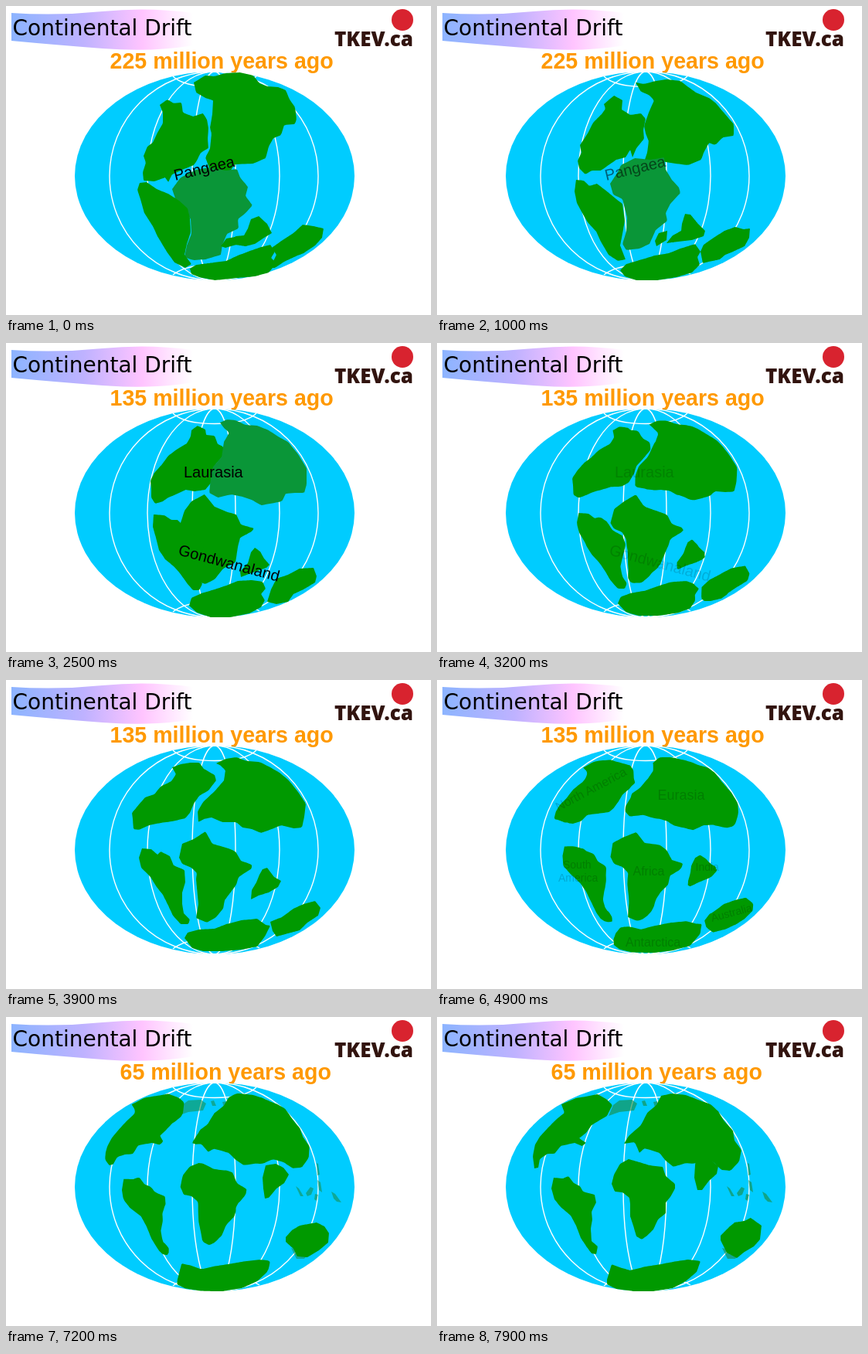
An HTML page for the animation above (8000 ms loop, 550 by 400 pixels).

```html
<!DOCTYPE html>
<html lang="en">
<head>
<meta charset="utf-8">
<title>Continental Drift</title>
<style>
html, body { margin: 0; width: 550px; height: 400px; overflow: hidden; background: #fff; }
svg { display: block; }
text { font-family: "Liberation Sans", Arial, sans-serif; }
#heading { font: 28px "DejaVu Sans", Verdana, sans-serif; }
#brand { font: 800 26px "Open Sans", sans-serif; fill: #32140f; }
#age { font-size: 28.6px; font-weight: bold; fill: #f90; }
</style>
</head>
<body>
<svg id="stage" width="550" height="400" viewBox="0 0 550 400">
  <defs>
    <linearGradient id="flag">
      <stop offset="0" stop-color="#8cb4ff"/>
      <stop offset=".4" stop-color="#bfb2ff"/>
      <stop offset=".72" stop-color="#ffc4ff"/>
      <stop offset="1" stop-color="#fff"/>
    </linearGradient>
  </defs>
  <path fill="url(#flag)" d="M7 9Q66 13 125 7T242 9V51Q190 60 125 55T7 45Z"/>
  <text id="heading" x="8.5" y="38">Continental Drift</text>
  <circle cx="513" cy="18" r="14" fill="#d8232f"/>
  <text id="brand" x="425" y="52">TKEV.ca</text>
  <text id="age" y="81"></text>
  <ellipse cx="270" cy="220" rx="181" ry="135" fill="#0cf"/>
  <g id="grid" fill="none" stroke="#fff" stroke-width="1.4"></g>
  <g id="isles" fill="#1a8f4a"></g>
  <g id="land"></g>
  <g id="labels"></g>
</svg>
<script>
const LOOP = 8000, STEP = 100, SAMPLES = 130;
const GREEN = '#090', LIGHT = '#0a9638';
const $ = id => document.getElementById(id);

function add(parent, tag, attrs, text) {
  const el = document.createElementNS('http://www.w3.org/2000/svg', tag);
  for (const k in attrs) el.setAttribute(k, attrs[k]);
  if (text) el.textContent = text;
  $(parent).appendChild(el);
  return el;
}

// Meridians and polar circles
for (const x of [134, 183, 241, 297, 354, 404])
  add('grid', 'path', { d: `M270 85A${Math.abs(x - 270)} 135 0 0 ${x < 270 ? 0 : 1} 270 355` });
add('grid', 'path', { d: 'M216 91Q230 104.500 270 104.500T324 91' });
add('grid', 'path', { d: 'M216 348Q232 335 270 335T328 347' });

const parse = s => s.split(' ').map(p => p.split(',').map(Number));

// Evenly spaced points around a closed outline, from its first corner
function resample(pts) {
  const ring = [...pts, pts[0]];
  const len = ring.slice(1).map((p, i) => Math.hypot(p[0] - ring[i][0], p[1] - ring[i][1]));
  const gap = len.reduce((a, b) => a + b) / SAMPLES;
  const out = [];
  let seg = 0, start = 0;
  for (let i = 0; i < SAMPLES; i++) {
    while (seg < len.length - 1 && start + len[seg] < i * gap) start += len[seg++];
    const f = (i * gap - start) / len[seg], [x, y] = ring[seg], [u, v] = ring[seg + 1];
    out.push([x + (u - x) * f, y + (v - y) * f]);
  }
  return out;
}

const lands = {};
function pose(name, time, outline) {
  const land = lands[name] ||= { keys: [], el: add('land', 'path', { fill: GREEN }) };
  land.keys.push({ time, pts: resample(parse(outline)) });
}

pose('northAmerica', 0, '199,128 209,121 217,126 227,125 229,138 242,143 255,139 260,147 262,158 261,172 262,184 252,190 247,200 243,206 228,212 215,218 210,228 206,222 192,227 178,226 177,215 181,203 178,194 183,182 190,177 196,164 203,152 203,138');
pose('northAmerica', 1000, '216,127 229,116 240,122 239,134 250,141 264,139 270,146 267,160 268,172 258,184 253,196 250,186 244,196 232,199 222,206 212,213 200,213 192,218 184,210 182,200 187,190 185,180 195,165 202,151 213,140 218,133');
pose('northAmerica', 2500, '240,113 248,107 258,112 259,119 270,120 274,131 281,134 281,146 272,156 266,168 266,180 258,190 244,192 233,190 220,196 210,200 203,205 193,208 188,200 188,188 187,178 192,168 202,157 210,146 222,137 234,130 239,121');
pose('northAmerica', 3900, '215,113 226,109 238,107 250,107 256,115 270,123 272,130 262,143 250,150 243,160 238,172 232,179 215,183 200,185 185,188 172,194 165,193 164,180 163,172 173,160 180,152 192,148 200,138 214,131 220,122');
pose('northAmerica', 5800, '166,114 180,103 196,101 214,98 232,99 240,106 247,116 257,121 250,130 238,136 228,150 222,162 208,163 192,165 188,178 176,180 168,176 158,180 150,184 143,190 137,190 136,180 142,166 146,157 158,141 170,128 172,118');
pose('northAmerica', 7900, '161,113 180,105 198,102 208,100 220,107 227,114 220,128 210,134 200,140 193,150 184,157 193,163 188,167 178,163 160,167 152,177 143,177 133,184 131,195 126,196 124,180 127,165 133,155 145,142 155,132 165,124');

pose('eurasia', 0, '243,99 258,90 270,91 284,87 303,86 320,90 328,100 338,104 352,105 362,109 367,121 374,131 376,146 374,153 360,154 356,167 346,171 340,182 336,197 320,204 296,205 290,214 264,212 258,196 264,185 266,165 264,158 267,140 268,122 258,119 246,112');
pose('eurasia', 1000, '257,99 268,101 283,97 297,95 315,97 324,104 335,112 352,119 361,126 372,139 384,153 384,168 370,170 360,180 352,177 345,190 342,199 325,206 308,204 285,200 268,202 272,190 274,175 270,165 268,155 274,138 281,122 274,115 264,111');
pose('eurasia', 2500, '277,103 286,99 297,100 310,106 325,107 340,113 352,121 365,128 378,144 389,162 389,183 386,194 374,194 362,195 357,205 342,208 330,210 318,203 306,199 292,196 274,200 263,194 265,175 268,160 279,148 282,128 289,116 282,110');
pose('eurasia', 3900, '272,108 284,102 298,100 312,105 328,106 342,113 354,120 366,130 378,145 388,160 386,177 383,191 372,192 356,188 344,193 330,198 318,193 306,191 298,184 280,184 266,178 256,180 249,184 248,170 255,158 270,144 282,130 284,117 277,110');
pose('eurasia', 5800, '286,107 292,98 308,100 325,102 340,111 355,112 364,120 370,132 383,146 390,158 393,173 388,186 376,191 362,188 345,184 332,191 316,189 302,184 289,176 270,172 258,172 240,168 239,160 245,150 243,143 255,137 264,126 276,118');
pose('eurasia', 7900, '290,102 304,99 322,101 340,108 354,113 364,122 371,134 383,147 385,160 394,172 391,187 380,199 368,198 358,188 345,184 332,190 322,189 306,194 296,186 288,176 276,172 268,170 262,176 256,162 242,164 248,154 264,140 272,124 284,114');

pose('africa', 0, '215,237 226,222 246,212 262,209 285,213 299,211 303,222 313,234 310,246 319,258 310,268 300,276 301,288 286,295 280,309 278,322 258,328 242,329 231,325 234,310 240,295 239,276 231,264 220,252');
pose('africa', 1000, '224,230 234,215 238,206 256,197 276,199 294,196 296,212 304,225 313,235 315,242 302,256 296,268 298,278 283,290 275,308 262,314 245,316 240,308 245,292 246,274 243,262 240,250 228,244');
pose('africa', 2500, '225,236 231,217 240,205 257,196 270,212 287,219 298,222 304,235 321,240 318,244 303,252 300,264 297,284 281,292 270,306 258,312 247,308 246,290 247,274 243,260 240,247 230,243');
pose('africa', 3900, '224,230 228,212 243,206 258,196 267,212 288,218 297,222 304,234 318,239 318,244 301,255 298,265 283,285 281,296 272,307 260,314 246,308 249,290 246,258 247,250 240,243 228,238');
pose('africa', 5800, '225,228 227,210 240,201 258,198 270,210 290,210 297,218 304,232 318,236 314,245 302,252 300,265 290,272 282,286 278,298 268,308 258,310 248,306 248,280 246,264 248,250 240,241 230,238');
pose('africa', 7900, '226,216 229,204 237,190 248,184 262,188 275,192 292,194 296,206 308,216 308,222 302,233 296,240 296,254 286,262 280,275 272,283 265,288 258,284 254,270 250,258 250,242 249,234 240,227 230,226');

pose('southAmerica', 0, '173,229 182,228 195,237 210,243 224,252 235,262 238,275 239,293 234,308 231,322 240,334 232,339 218,332 208,318 196,298 190,285 179,268 174,250 170,238');
pose('southAmerica', 1000, '180,225 190,226 197,233 207,230 220,240 232,250 240,256 243,278 240,295 237,310 244,328 234,330 222,322 212,305 206,292 195,280 188,268 181,255 178,240');
pose('southAmerica', 2500, '191,222 205,223 214,229 222,229 240,247 248,252 256,262 252,280 247,290 249,300 254,312 250,320 242,320 235,312 225,298 218,290 206,280 198,268 194,252 190,238');
pose('southAmerica', 3900, '176,218 188,219 196,226 200,222 212,228 217,240 231,246 232,262 228,275 228,290 230,302 238,310 236,316 226,316 216,305 210,292 203,278 195,268 187,255 175,243 172,230');
pose('southAmerica', 5800, '155,213 167,212 177,210 183,219 195,222 200,230 209,237 207,250 207,268 203,282 207,292 214,297 218,310 212,311 202,306 196,295 189,281 185,272 178,260 162,250 153,238');
pose('southAmerica', 7900, '151,208 163,209 170,206 177,215 185,219 189,226 204,230 206,240 200,252 201,262 199,274 200,290 208,297 206,307 200,306 194,298 186,286 180,270 173,257 160,246 152,236 148,222');

pose('india', 0, '317,276 327,272 338,282 344,294 334,300 322,308 310,311 296,309 291,306 297,298 308,297 313,288');
pose('india', 1000, '317,282 321,269 328,270 337,281 347,291 345,298 330,303 312,305 297,307 305,297 316,291');
pose('india', 2500, '317,271 322,265 329,270 334,279 341,287 337,291 322,296 304,303 303,296 313,285');
pose('india', 3900, '332,245 338,243 347,255 356,260 352,268 340,275 327,279 317,284 318,272 324,262 328,252');
pose('india', 5800, '336,217 343,211 352,214 359,222 371,228 366,238 352,245 342,250 331,255 332,240 331,228');
pose('india', 7200, '336,192 349,190 359,195 366,204 360,215 350,222 340,234 335,235 333,222 332,208');
pose('india', 7900, '335,182 350,182 364,193 362,203 352,212 343,224 337,224 333,208 334,192');

pose('madagascar', 0, '285,301 296,299 298,309 284,313 278,311');
pose('madagascar', 1000, '287,294 298,291 297,303 284,311 282,304');
pose('madagascar', 2500, '274,280 285,279 285,286 274,290 272,285');

pose('antarctica', 0, '238,340 246,335 262,333 285,330 300,323 316,317 330,312 342,309 348,318 343,326 350,333 340,345 322,350 300,352 270,355 250,351 240,347');
pose('antarctica', 1000, '237,342 245,334 262,329 282,323 300,320 315,314 334,308 341,318 337,325 340,335 330,345 310,351 285,355 258,355 243,350');
pose('antarctica', 2500, '237,340 240,330 253,324 270,319 285,314 300,308 318,307 332,309 336,318 330,325 335,333 330,342 315,350 290,355 265,355 247,349');
pose('antarctica', 3900, '231,334 235,327 250,323 270,322 285,316 305,311 325,309 336,317 342,318 335,332 325,345 305,349 280,351 255,351 241,347');
pose('antarctica', 5800, '226,338 230,317 242,316 258,324 275,321 300,317 322,315 343,314 344,328 330,343 305,351 280,355 250,354 232,350 223,346');
pose('antarctica', 7900, '220,340 226,320 236,324 250,328 270,323 290,320 305,317 325,314 341,316 336,330 322,342 305,351 280,355 255,355 232,352 220,346');

pose('australia', 0, '344,313 358,303 372,294 384,283 398,285 411,288 409,300 400,310 385,320 375,324 360,331 348,339 336,339 346,330 350,322');
pose('australia', 1000, '341,318 345,309 358,300 372,291 386,286 397,289 405,288 404,300 398,311 383,318 373,322 366,328 352,331 344,333');
pose('australia', 2500, '343,319 350,305 365,300 380,292 398,291 402,302 400,310 385,319 372,325 365,335 350,338 338,335');
pose('australia', 3900, '342,313 357,307 372,296 385,290 400,286 407,295 404,305 390,314 380,324 365,328 350,332 345,325');
pose('australia', 5800, '350,310 352,298 360,293 370,285 388,280 400,278 412,284 413,293 405,305 390,311 380,318 363,322 352,318');
pose('australia', 7200, '362,291 362,285 370,276 380,270 402,266 412,271 418,280 417,292 405,302 390,311 377,310 372,300');
pose('australia', 7900, '367,289 367,283 378,272 385,266 398,264 406,260 420,270 418,288 410,297 398,304 388,312 375,305');

// Islands that rise late
for (const s of [
  '222,128 228,114 236,108 252,107 259,112 255,121 236,123', '265,109 269,108 272,115 267,115', '280,110 285,109 287,116 282,117',
  '375,219 379,222 385,232 381,232', '388,228 394,220 398,222 395,230 390,232', '402,189 404,190 406,204 403,205',
  '403,211 407,214 409,227 405,224', '400,229 404,230 402,238 399,236', '421,226 426,229 434,240 428,239 424,235', '369,299 382,302 396,300 386,313 376,313'
]) add('isles', 'polygon', { points: s });

// text, x, y, size, angle, start of fade in, fully shown, start of fade out, gone
const labels = [
  ['Pangaea', 219, 226, 20, -13.5, -2, -1, 600, 1450],
  ['Laurasia', 230, 174, 20, 0, 1800, 2300, 2600, 3300],
  ['Gondwanaland', 222, 274, 20, 15, 1800, 2300, 2600, 3300],
  ...[
    ['North America', 157, 170, 16, -28], ['Eurasia', 285.5, 155, 18, 0],
    ['Africa', 253.5, 253, 16, 0], ['South', 163, 244, 14, 0],
    ['America', 157, 261, 14, 0], ['India', 334.5, 247, 14, 0],
    ['Australia', 356, 313, 14, -15], ['Antarctica', 244, 345, 16, 0]
  ].map(l => [...l, 4800, 5400, 6000, 6800])
].map(([text, x, y, size, angle, ...fade]) => ({
  fade, el: add('labels', 'text', { 'font-size': size, transform: `translate(${x} ${y}) rotate(${angle})` }, text)
}));

const ramp = (t, a, b) => Math.min(1, Math.max(0, (t - a) / (b - a)));

function outlineAt(keys, t) {
  const i = Math.max(0, keys.findLastIndex(k => k.time <= t));
  const a = keys[i], b = keys[i + 1] || a;
  const f = a === b ? 0 : ramp(t, a.time, b.time);
  return 'M' + a.pts.map(([x, y], n) =>
    (x + (b.pts[n][0] - x) * f).toFixed(1) + ' ' + (y + (b.pts[n][1] - y) * f).toFixed(1)).join('L') + 'Z';
}

function draw(t) {
  for (const { keys, el } of Object.values(lands)) el.setAttribute('d', outlineAt(keys, t));
  lands.africa.el.setAttribute('fill', t < 1800 ? LIGHT : GREEN);
  lands.eurasia.el.setAttribute('fill', t >= 1800 && t < 3000 ? LIGHT : GREEN);
  lands.madagascar.el.setAttribute('opacity', t < 2400 ? 1 : 0);
  for (const { fade: [a, b, c, d], el } of labels)
    el.setAttribute('opacity', ramp(t, a, b) * (1 - ramp(t, c, d)));
  $('isles').setAttribute('opacity', 0.65 * ramp(t, 5700, 7400));
  const years = t < 2000 ? 225 : t < 5000 ? 135 : 65;
  $('age').textContent = years + ' million years ago';
  $('age').setAttribute('x', years > 99 ? 134.5 : 147.5);
}

let last = -1;
const begin = performance.now();
function tick() {
  const t = Math.floor((performance.now() - begin) % LOOP / STEP) * STEP;
  if (t !== last) draw(last = t);
  requestAnimationFrame(tick);
}
tick();
</script>
</body>
</html>
```
